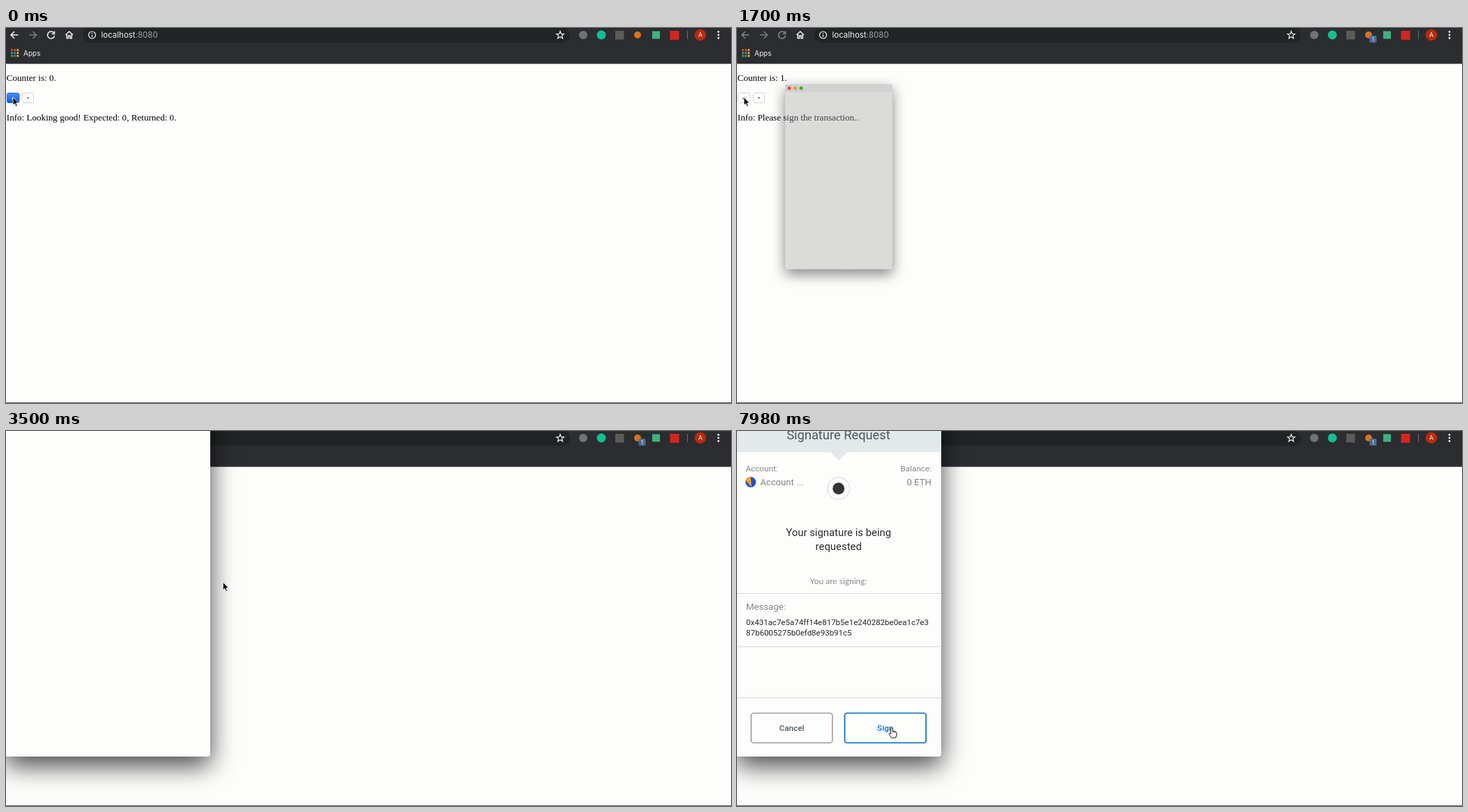
An HTML page for the animation above (8000 ms loop, 1040 by 539 pixels).

```html
<!DOCTYPE html>
<html lang="en">
<head>
<meta charset="utf-8">
<title>Counter</title>
<style>
html, body { margin: 0; width: 100%; height: 100%; overflow: hidden; background: #fdfdfc; }
svg, #popup { position: absolute; left: 0; top: 0; width: 1040px; height: 539px; }
#popup { transform-origin: 146px 214px; }
#shade, #face { position: absolute; left: -1px; top: -40px; width: 294px; height: 508px; border-radius: 4px; }
#face { background: linear-gradient(#d6d6d6 20px, #fdfdfc 20px); }
.ui { font-family: Inter, sans-serif; }
.serif { font: 13.1px "Liberation Serif", serif; }
.dialog { font-family: Roboto, sans-serif; }
.line { fill: none; stroke: #f1f1f1; stroke-width: 1.5; }
.mid { text-anchor: middle; }
</style>
</head>
<body>
<svg id="page" viewBox="0 0 1040 539">
  <rect width="1040" height="51.5" fill="#2b2d31"/>
  <rect x="110" y="-1" width="699" height="22" rx="11" fill="#202425"/>
  <g class="line">
    <path id="back" d="M17.500 10H7.500M12 5L7 10L12 15"/>
    <path d="M33 10H43M38.500 5L43.500 10L38.500 15" stroke="#7b7d80"/>
    <path id="reload" d="M68.500 7A5 5 0 1 0 69.500 11M69.500 4.500V8.500H65.500"/>
    <path d="M85.500 10L90.700 5L96 10M87.300 9V14.700H89.500V11H92V14.700H94.200V9"/>
    <circle cx="123.500" cy="10" r="5" stroke-width="1.2"/>
    <path d="M123.500 9.500V13M123.500 7V8.200" stroke-width="1.3"/>
    <path d="M795 4.700L796.500 8.400L800.400 8.600L797.400 11.100L798.400 14.900L795 12.800L791.600 14.900L792.600 11.100L789.600 8.600L793.500 8.400Z" stroke-width="1.2"/>
    <path d="M977.500 4V16" stroke="#6b6d70" stroke-width="1"/>
  </g>
  <circle cx="828" cy="10" r="6" fill="#707376"/>
  <circle cx="854" cy="10" r="6.500" fill="#15bd93"/>
  <rect x="874" y="4" width="12.500" height="12.500" fill="#5c5d58"/>
  <circle cx="906" cy="10" r="5" fill="#d8731f"/>
  <rect x="927" y="4.500" width="11" height="11" fill="#3fb27f"/>
  <rect x="952.500" y="4" width="13" height="13" fill="#d3261f"/>
  <circle cx="996" cy="10" r="8.300" fill="#b72b0c"/>
  <g fill="#f1f1f1"><circle cx="1022" cy="5.500" r="1.400"/><circle cx="1022" cy="10" r="1.400"/><circle cx="1022" cy="14.500" r="1.400"/></g>
  <g class="ui" fill="#f1f1f1">
    <text x="136.500" y="14" font-size="11.500">localhost<tspan fill="#9b9fa4">:8080</tspan></text>
    <text x="25" y="39.500" font-size="10">Apps</text>
    <text class="mid" x="996" y="13.200" font-size="9">A</text>
    <g id="badge">
      <rect x="907.500" y="11" width="10" height="10" rx="1.500" fill="#4b6b96"/>
      <text class="mid" x="912.500" y="19" font-size="8">1</text>
    </g>
  </g>
  <g id="apps"></g>
  <g class="serif">
    <text id="counter" x="0.800" y="76.300"></text>
    <text id="info" x="0.800" y="132.800"></text>
  </g>
  <defs>
    <linearGradient id="blue" x2="0" y2="1"><stop stop-color="#4790fb"/><stop offset="1" stop-color="#0c58e6"/></linearGradient>
  </defs>
  <g stroke="#d2d2d2" fill="#fff">
    <rect id="plus" x="1.500" y="93.500" width="17.500" height="14" rx="2.500"/>
    <rect x="23.500" y="93.500" width="16" height="14" rx="2.500"/>
  </g>
  <g class="ui mid" font-size="10">
    <text id="plusSign" x="10" y="104">+</text>
    <text x="31.600" y="103.500">-</text>
  </g>
  <rect y="538" width="1040" height="1" fill="#5b5b5b"/>
</svg>

<div id="popup">
  <div id="shade"></div>
  <div id="face"></div>
  <svg viewBox="0 0 1040 539" overflow="visible">
    <g><circle cx="10.300" cy="-29.600" r="4.800" fill="#e8483f"/><circle cx="26.500" cy="-29.600" r="4.800" fill="#dfa023"/><circle cx="42.700" cy="-29.600" r="4.800" fill="#4ba52c"/></g>
    <g id="dialog" class="dialog" fill="#858585">
      <path d="M-1 -20H293V30.500H158L146 42L134 30.500H-1Z" fill="#e3e8eb"/>
      <text class="mid" x="145.500" y="12" font-size="18.300" fill="#50565d">Signature Request</text>
      <text x="12.500" y="58.300" font-size="11.700">Account:</text>
      <text x="279" y="58.300" font-size="11.700" text-anchor="end">Balance:</text>
      <text x="33.300" y="78" font-size="13.100">Account ...</text>
      <text x="279" y="78" font-size="13.200" text-anchor="end">0 ETH</text>
      <circle cx="19.700" cy="73.500" r="7.500" fill="#1e4fd8"/>
      <path d="M19.500 66A7.500 7.500 0 0 0 12.500 71L21 80.800Z" fill="#f6a51c"/>
      <circle cx="145.700" cy="82.700" r="16" fill="#fff" stroke="#cfd0d2"/>
      <circle cx="145.700" cy="82.700" r="8.500" fill="#343434"/>
      <g class="mid" font-size="14.900" fill="#2a2a2a">
        <text x="145.700" y="151">Your signature is being</text>
        <text x="145.700" y="170.500">requested</text>
      </g>
      <text class="mid" x="145.500" y="219.800" font-size="12" style="font-family:Lato,sans-serif">You are signing:</text>
      <path d="M-1 233.500H293M-1 310H293M-1 383.500H293" stroke="#d4d4dc"/>
      <text x="13" y="257.300" font-size="13.200">Message:</text>
      <g font-size="11.520" fill="#262626">
        <text x="13" y="278.500">0x431ac7e5a74ff14e817b5e1e240282be0ea1c7e3</text>
        <text x="13" y="294">87b6005275b0efd8e93b91c5</text>
      </g>
      <g fill="none" stroke-width="1.600">
        <rect x="20.300" y="405.500" width="116.500" height="42.700" rx="3.500" stroke="#9d9d9d"/>
        <rect x="154.500" y="405.500" width="116.700" height="42.700" rx="3.500" stroke="#9fcdee"/>
        <rect id="hover" x="154.500" y="405.500" width="116.700" height="42.700" rx="3.500" stroke="#0b70c5"/>
      </g>
      <g class="mid" font-size="11.700" font-weight="500">
        <text x="78.500" y="431" fill="#4d5966">Cancel</text>
        <text x="212.700" y="431" fill="#0b70c5">Sign</text>
      </g>
    </g>
  </svg>
</div>

<svg viewBox="0 0 1040 539">
  <path id="arrow" d="M0 0V11.500L2.600 9.100L4.400 13.300L6.300 12.500L4.500 8.400H8Z" stroke="#fff" stroke-width=".8"/>
  <g id="hand" fill="#fff" stroke="#111" stroke-linejoin="round">
    <path d="M-1.300 1Q0 -.7 1.300 1V4.800L5.400 5.700Q7 6.200 7 8V10.500L5.500 14.500H-.3L-3.800 9.300Q-3.800 7.300 -2.300 7.900L-1.300 9Z"/>
    <path d="M1.300 4.800V7M3.300 5.300V7.300M5.300 5.800V7.500" stroke-width=".7"/>
  </g>
</svg>

<script>
const $ = id => document.getElementById(id);
const LOOP = 8000, UPDATE = 160, OPEN = 1560, GROW = 1660, CONTENT = 3700, HOVER = 5480;
const progress = (t, start, end) => Math.min(1, Math.max(0, (t - start) / (end - start)));
const smooth = u => (1 - Math.cos(Math.PI * u)) / 2;
const show = (id, on) => $(id).style.display = on ? '' : 'none';

const appColors = ['#e5483a', '#e5483a', '#e8a33a', '#42a55a', '#4a8af0', '#e8b93a', '#42a55a', '#42a55a', '#e8b93a'];
$('apps').innerHTML = appColors.map((color, i) =>
  `<rect x="${7 + i % 3 * 4.2}" y="${30.3 + Math.floor(i / 3) * 4.2}" width="2.8" height="2.8" fill="${color}"/>`).join('');

// Pointer moves: start, end, from, to
const moves = [
  [2500, 3200, [10, 99.5], [311.3, 217.3]],
  [5040, 5740, [311.3, 217.3], [194, 438.5]],
  [6140, 6600, [194, 438.5], [222, 426.5]],
];

function pointer(t) {
  const [start, end, a, b] = moves.findLast(m => t >= m[0]) || moves[0];
  const u = smooth(progress(t, start, end));
  return a.map((v, i) => v + (b[i] - v) * u);
}

function draw(t) {
  const clicked = t >= UPDATE, opened = t >= OPEN;
  $('counter').textContent = `Counter is: ${+clicked}.`;
  $('info').textContent = 'Info: ' + (clicked ? 'Please sign the transaction..' : 'Looking good! Expected: 0, Returned: 0.');
  $('plus').style.fill = clicked ? '' : 'url(#blue)';
  $('plus').style.stroke = clicked ? '' : '#2468df';
  $('plusSign').style.fill = clicked ? '' : '#fff';
  $('back').style.stroke = $('reload').style.stroke = opened ? '#85878a' : '';
  show('badge', t >= 1400);

  const grown = 1 - (1 - progress(t, GROW, GROW + 300)) ** 2;
  show('popup', opened);
  $('popup').style.transform = `scale(${0.36 + 0.64 * grown})`;
  $('shade').style.background = `rgba(0,0,0,${0.33 * (1 - grown) ** 2})`;
  $('shade').style.boxShadow = `0 13px 36px rgba(0,0,0,${0.4 + 0.32 * grown}), 0 0 1px rgba(0,0,0,${0.7 * grown})`;
  $('face').style.opacity = grown;
  show('dialog', t >= CONTENT);
  $('hover').style.opacity = progress(t, HOVER, HOVER + 200);

  const [x, y] = pointer(t), overSign = y > 405;
  show('arrow', !overSign);
  show('hand', overSign);
  $(overSign ? 'hand' : 'arrow').setAttribute('transform', `translate(${x} ${y})`);
}

function tick() {
  draw(performance.now() % LOOP);
  requestAnimationFrame(tick);
}
tick();
</script>
</body>
</html>
```
